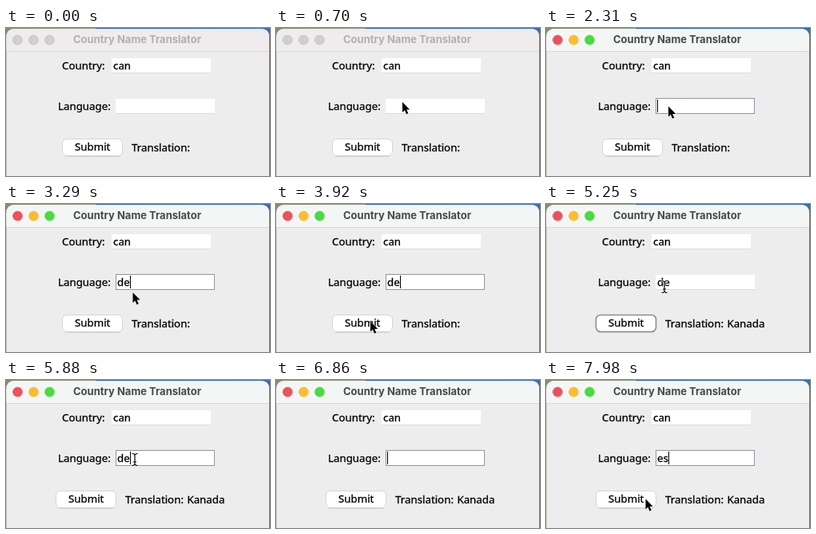
Recreate the animation shown at these times as an HTML page. Size 330x186 px, loop 8 s.

```html
<!DOCTYPE html>
<html lang="en">
<head>
<meta charset="utf-8">
<title>Country Name Translator</title>
<style>
  html, body { margin: 0; width: 100%; height: 100%; overflow: hidden; background: #ececec; }
  svg { display: block; width: 330px; height: 186px; }
  text { font: 13.3px "Noto Sans", "Open Sans", sans-serif; word-spacing: 1px; stroke: #000; stroke-width: .3px; white-space: pre; }
  .title { font: 700 13px Inter, Roboto, sans-serif; word-spacing: 0; fill: #b1afb0; stroke: none; text-anchor: middle; }
  .active .title { fill: #484a4a; }
  .light { fill: #d0cecf; stroke: #bfbdbe; stroke-width: .6; }
  .active .light { fill: var(--on); stroke: var(--on); }
  .bar { fill: #eeecec; }
  .active .bar { fill: #f3f6f5; }
  .outline { fill: none; stroke: #90969f; visibility: hidden; }
  .on-field .outline { visibility: visible; }
  .button { fill: #fff; stroke: #d6d6d6; }
  .on-button .button { stroke: #858f99; stroke-width: 1.6; }
  .pressed .button { fill: #e4e4e4; }
  .halo { stroke: #fff; stroke-width: 2.4; }
  .stem { stroke: #000; stroke-width: 1.2; }
</style>
</head>
<body>
<svg id="stage" viewBox="0 0 330 186">
  <defs>
    <linearGradient id="desk">
      <stop offset="0" stop-color="#858c72"/>
      <stop offset=".34" stop-color="#8a9a86"/>
      <stop offset=".34" stop-color="#34609c"/>
      <stop offset="1" stop-color="#3c6fb4"/>
    </linearGradient>
    <path id="beam" fill="none" d="M-3.5 -7.5Q0 -7.5 0 -5Q0 -7.5 3.5 -7.5M0 -5V5M-3.5 7.5Q0 7.5 0 5Q0 7.5 3.5 7.5M-2 3H2"/>
  </defs>
  <rect width="330" height="186" fill="url(#desk)"/>
  <rect x=".5" y="1" width="328.5" height="200" rx="10" fill="#ededed"/>
  <path class="bar" d="M.5 29V11Q.5 1 10.5 1H319Q329 1 329 11V29Z"/>
  <path d="M.5 29.5H329" stroke="#d6d6d6"/>
  <circle class="light" cx="14.5" cy="15" r="6" style="--on:#ed5159"/>
  <circle class="light" cx="34.5" cy="15" r="6" style="--on:#fabc2f"/>
  <circle class="light" cx="54.5" cy="15" r="6" style="--on:#4cd941"/>
  <text class="title" x="164" y="19">Country Name Translator</text>

  <text x="70" y="52">Country:</text>
  <rect x="132" y="38" width="124" height="18" fill="#fff"/>
  <path d="M132 56.5H256" stroke="#dcdcdc"/>
  <text x="134" y="52">can</text>

  <text x="65" y="103">Language:</text>
  <rect x="137" y="89" width="124" height="18" fill="#fff"/>
  <path d="M137 107.5H261" stroke="#dcdcdc"/>
  <rect class="outline" x="137.5" y="88.5" width="123" height="19"/>
  <text id="value" x="139" y="103"></text>
  <rect id="caret" y="90" width="1" height="16"/>

  <g id="row">
    <path d="M74 161.5H142" stroke="#d2d2d2"/>
    <rect class="button" x="70.5" y="139.5" width="75" height="21" rx="5.5"/>
    <text x="86" y="154">Submit</text>
    <text id="result" x="157" y="155"></text>
  </g>

  <circle id="ring" r="17" fill="none" stroke="#333" stroke-width="1.5"/>
  <path id="arrow" d="M0 .5V13.5L2.9 10.8L5 15.7L7.3 14.7L5.2 9.9H9.2Z" stroke="#fff" paint-order="stroke"/>
  <g id="ibeam"><use href="#beam" class="halo"/><use href="#beam" class="stem"/></g>
</svg>
<script>
const LOOP = 8000, STEP = 70, BLINK = 500, CLICK = 210;
const $ = id => document.getElementById(id);
const stage = $('stage');

const ERASE = '<';
const keys = [
  { time: 2380, key: 'd' }, { time: 2800, key: 'e' },
  { time: 6650, key: ERASE }, { time: 6860, key: ERASE },
  { time: 7350, key: 'e' }, { time: 7560, key: 's' }
];
const clicks = [
  { down: 1050, time: 1260, target: 'field' },
  { down: 4270, time: 4340, target: 'button' },
  { down: 5670, time: 5740, target: 'field' }
];
const entry = { x: 167, y: 186 };
const moves = [
  { from: 210, to: 700, x: 158, y: 92.5 },
  { from: 1750, to: 1820, x: 153, y: 98 },
  { from: 3010, to: 3850, x: 118, y: 147, bulge: 20 },
  { from: 4970, to: 5250, x: 148, y: 104 },
  { from: 5250, to: 5600, x: 161, y: 100 },
  { from: 7770, to: 7980, x: 124.5, y: 149 }
];

const show = (el, on) => el.setAttribute('visibility', on ? 'visible' : 'hidden');
const place = (el, x, y) => el.setAttribute('transform', `translate(${x} ${y})`);
const ease = k => k * k * (3 - 2 * k);
const before = (list, t) => list.filter(({ time }) => time <= t);

function pointerPosition(t) {
  let { x, y } = entry;
  for (const move of moves) {
    const k = ease(Math.min(1, Math.max(0, (t - move.from) / (move.to - move.from))));
    x += (move.x - x) * k + (move.bulge ?? 0) * Math.sin(Math.PI * k);
    y += (move.y - y) * k;
  }
  return [x, y];
}

function pointerKind(t) {
  const typing = t >= 6300 && t < 7840;
  if (t < 280 || typing) return '';
  return t >= 5180 && t < 6300 ? 'ibeam' : 'arrow';
}

function drawField(t, focus) {
  const text = before(keys, t).reduce((s, { key }) => key === ERASE ? s.slice(0, -1) : s + key, '');
  $('value').textContent = text;
  $('caret').setAttribute('x', Math.round(139 + (text ? $('value').getComputedTextLength() : 0)));

  // Each click or key restarts the blink
  const restart = Math.max(...before([...clicks, ...keys], t).map(({ time }) => time));
  show($('caret'), focus === 'field' && (t - restart) % (2 * BLINK) < BLINK);
}

function drawPointer(t) {
  const [x, y] = pointerPosition(t), kind = pointerKind(t);
  for (const id of ['arrow', 'ibeam']) {
    place($(id), x, y);
    show($(id), kind === id);
  }
  if (kind === 'arrow') place($('ring'), x + 5, y + 7);
  else place($('ring'), x, y);
  show($('ring'), clicks.some(({ down }) => t >= down && t < down + CLICK));
}

function draw(t) {
  const focus = before(clicks, t).at(-1)?.target;
  const [wake, submit] = clicks;
  const done = t >= submit.down + CLICK;
  stage.classList.toggle('active', t > wake.down);
  stage.classList.toggle('on-field', focus === 'field');
  stage.classList.toggle('on-button', focus === 'button');
  stage.classList.toggle('pressed', focus === 'button' && !done);

  $('result').textContent = done ? 'Translation: Kanada' : 'Translation:';
  place($('row'), done ? -8 : 0, 0);
  drawField(t, focus);
  drawPointer(t);
}

const start = performance.now();
function tick() {
  const elapsed = (performance.now() - start) % LOOP;
  draw(Math.floor(elapsed / STEP) * STEP);
  requestAnimationFrame(tick);
}
tick();
</script>
</body>
</html>
```
